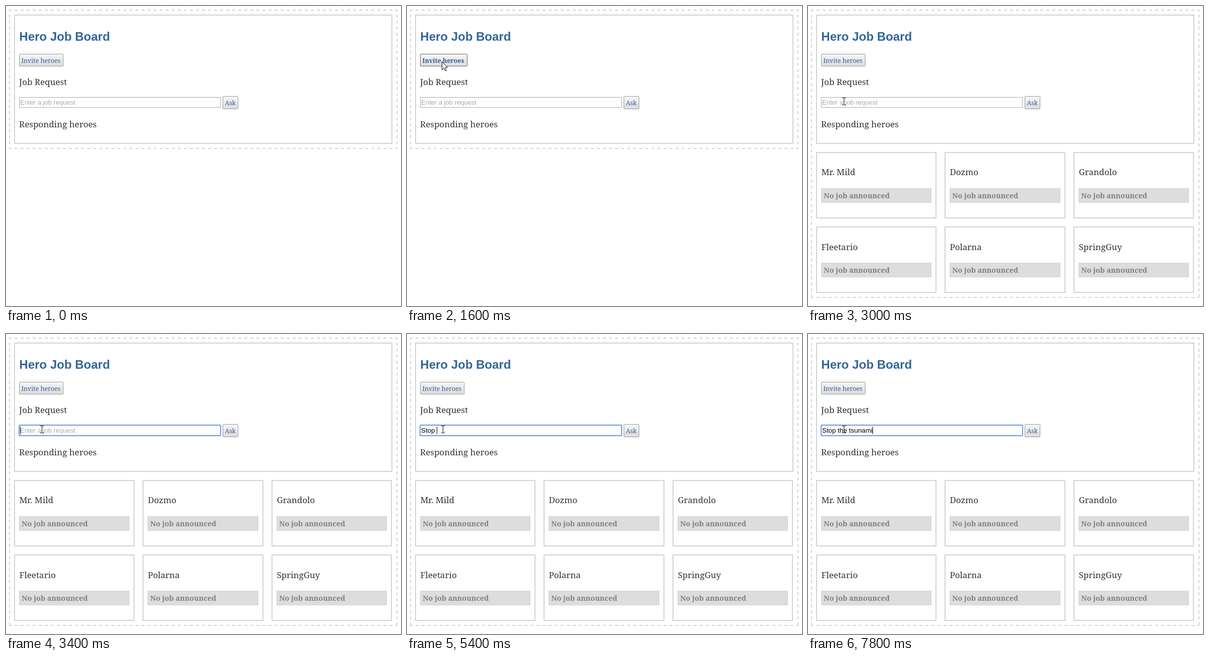
Recreate the animation shown at these times as an HTML page. Size 784 by 596 pixels, loop 8 s.

```html
<!DOCTYPE html>
<html lang="en">
<head>
<meta charset="utf-8">
<title>Hero Job Board</title>
<style>
  html, body { margin: 0; width: 100%; height: 100%; overflow: hidden; background: #fff; }
  svg { display: block; }
  text { white-space: pre; }
  .serif { font-family: "Noto Serif", serif; }
  .sans { font-family: "Liberation Sans", Arial, sans-serif; }
  .title { font-size: 24px; font-weight: bold; fill: #369; }
  .heading { font-size: 17px; fill: #333; }
  .label { font-size: 12.4px; fill: #3a5c98; }
  .status { font-size: 14.3px; font-weight: bold; fill: #808080; }
  .field { font-size: 13.333px; fill: #000; }
  .hint { font-size: 13px; fill: #a9a9a9; }
</style>
</head>
<body>
<svg id="stage" width="784" height="596" viewBox="0 0 784 596">
  <defs>
    <linearGradient id="face" x2="0" y2="1">
      <stop offset="0" stop-color="#f6f6f6"/>
      <stop offset="1" stop-color="#dcdcdc"/>
    </linearGradient>
  </defs>
</svg>
<script>
const LOOP = 8000;
const GRAY = '#d3d3d3';
const HEROES = ['Mr. Mild', 'Dozmo', 'Grandolo', 'Fleetario', 'Polarna', 'SpringGuy'];
const PHRASE = 'Stop the tsunami';
const stage = document.getElementById('stage');

function add(parent, tag, attrs, content = '') {
  const node = document.createElementNS('http://www.w3.org/2000/svg', tag);
  for (const key in attrs) node.setAttribute(key, attrs[key]);
  node.textContent = content;
  return parent.appendChild(node);
}
const group = (parent = stage) => add(parent, 'g', {});
const text = (parent, x, y, style, content) => add(parent, 'text', { x, y, class: style }, content);

// Rectangle given by its outer edges, with the border drawn inside them.
function box(parent, left, top, right, bottom, line, stroke, fill = 'none', rx = 0) {
  return add(parent, 'rect', {
    x: left + line / 2, y: top + line / 2, width: right - left - line, height: bottom - top - line,
    rx, fill, stroke, 'stroke-width': line
  });
}

function dashes(parent, x1, y1, x2, y2, offset) {
  add(parent, 'line', {
    x1, y1, x2, y2, stroke: GRAY, 'stroke-width': 2, 'shape-rendering': 'crispEdges',
    'stroke-dasharray': '6 6', 'stroke-dashoffset': offset
  });
}

// Each side is a list of [from, to, dash offset] runs.
function dashedFrame(parent, bottom, sides) {
  for (const y of [8, bottom - 1]) {
    dashes(parent, 8, y, 775, y, 3);
    for (const x of [6, 775]) add(parent, 'rect', { x, y: y - 1, width: 2, height: 2, fill: GRAY });
  }
  for (const x of [7, 776])
    for (const [from, to, offset] of sides) dashes(parent, x, from, x, to, offset);
}

function button(left, top, right, bottom, label) {
  const g = group();
  const face = box(g, left, top, right, bottom, 1, '#999', 'url(#face)', 1);
  const caption = text(g, left + 4.5, top + (bottom - top) / 2 + 5, 'serif label', label);
  return { face, caption };
}

const closedFrame = group();
dashedFrame(closedFrame, 284, [[9, 282, 4]]);
const openFrame = group();
dashedFrame(openFrame, 580, [[9, 91, 4], [91, 578, 10]]);

box(stage, 16, 17, 767, 274, 2, GRAY);
text(stage, 26.3, 69, 'sans title', 'Hero Job Board');
text(stage, 26, 157, 'serif heading', 'Job Request');
text(stage, 26, 241, 'serif heading', 'Responding heroes');
const invite = button(26, 95, 114, 120, 'Invite heroes');
button(430, 179, 461, 205, 'Ask');

HEROES.forEach((hero, i) => {
  const column = i % 3;
  const left = [16, 271, 527][column];
  const right = [255, 511, 766][column];
  const top = i < 3 ? 290 : 438;
  box(openFrame, left, top, right, top + 132, 2, GRAY);
  text(openFrame, left + 10.4, top + 46 + (i > 2), 'serif heading', hero);
  box(openFrame, left + 10, top + 72, right - 10, top + 101, 1, GRAY, '#ddd');
  text(openFrame, left + 15.3, top + 92, 'serif status', 'No job announced');
});

box(stage, 26, 181, 426, 202, 1, '#a9a9a9', '#fff');
const focusRing = box(stage, 25, 180, 427, 203, 2, '#699ce4', '#fff', 1.5);
const hint = text(stage, 28, 196, 'sans hint', 'Enter a job request');
const typed = text(stage, 28, 196, 'sans field', '');
const caret = add(stage, 'rect', { y: 184, width: 1, height: 15, fill: '#000' });

const arrow = add(stage, 'path', {
  d: 'M.5 .5V16.5L4.2 13 6.7 18.5H9L8.9 17.3 6.9 12H11.6Z',
  fill: '#fff', stroke: '#000', 'stroke-linejoin': 'round'
});
const beam = add(stage, 'path', {
  d: 'M68 182.5h3m1 0h3M71.5 183v13M68 196.5h3m1 0h3',
  fill: 'none', stroke: '#000', 'shape-rendering': 'crispEdges'
});

function show(node, visible) {
  node.setAttribute('visibility', visible ? 'visible' : 'hidden');
}

function pointerAt(t) {
  if (t < 2600) {
    const p = Math.min(1, (t - 600) / 1000);
    const eased = 1 - (1 - p) ** 1.6;
    return [Math.round(7 + 62 * eased), Math.round(154 - 44 * eased)];
  }
  return t < 2800 ? [70, 134] : [71, 160];
}

function typedCount(t) {
  if (t < 4400) return 0;
  if (t < 4800) return 1;
  if (t < 6000) return 2 + (t - 4800) / 200;
  if (t < 6600) return 9;
  if (t < 7000) return 10;
  return 11 + (t - 7000) / 200 + (t >= 7400);
}

function draw(now) {
  const t = Math.floor((now % LOOP) / 200) * 200;
  const open = t >= 2200;
  show(closedFrame, !open);
  show(openFrame, open);

  const [x, y] = pointerAt(t);
  arrow.setAttribute('transform', `translate(${x} ${y})`);
  show(arrow, t >= 600 && t < 3000);
  show(beam, t >= 3000);

  const hover = t >= 600 && t < 2600 && x >= 26 && y < 120;
  invite.face.setAttribute('width', hover ? 93 : 87);
  invite.face.setAttribute('stroke', hover ? '#666' : '#999');
  invite.caption.setAttribute('font-weight', hover ? 'bold' : 'normal');

  const count = Math.floor(typedCount(t));
  typed.textContent = PHRASE.slice(0, count);
  show(focusRing, t >= 3400);
  show(hint, !count);
  const width = count ? typed.getComputedTextLength() : 0;
  caret.setAttribute('x', Math.floor(28 + width));
  show(caret, count > 0 || (t >= 3400 && t < 3800));
}

const start = performance.now();
function tick() {
  draw(performance.now() - start);
  requestAnimationFrame(tick);
}
tick();
</script>
</body>
</html>
```
